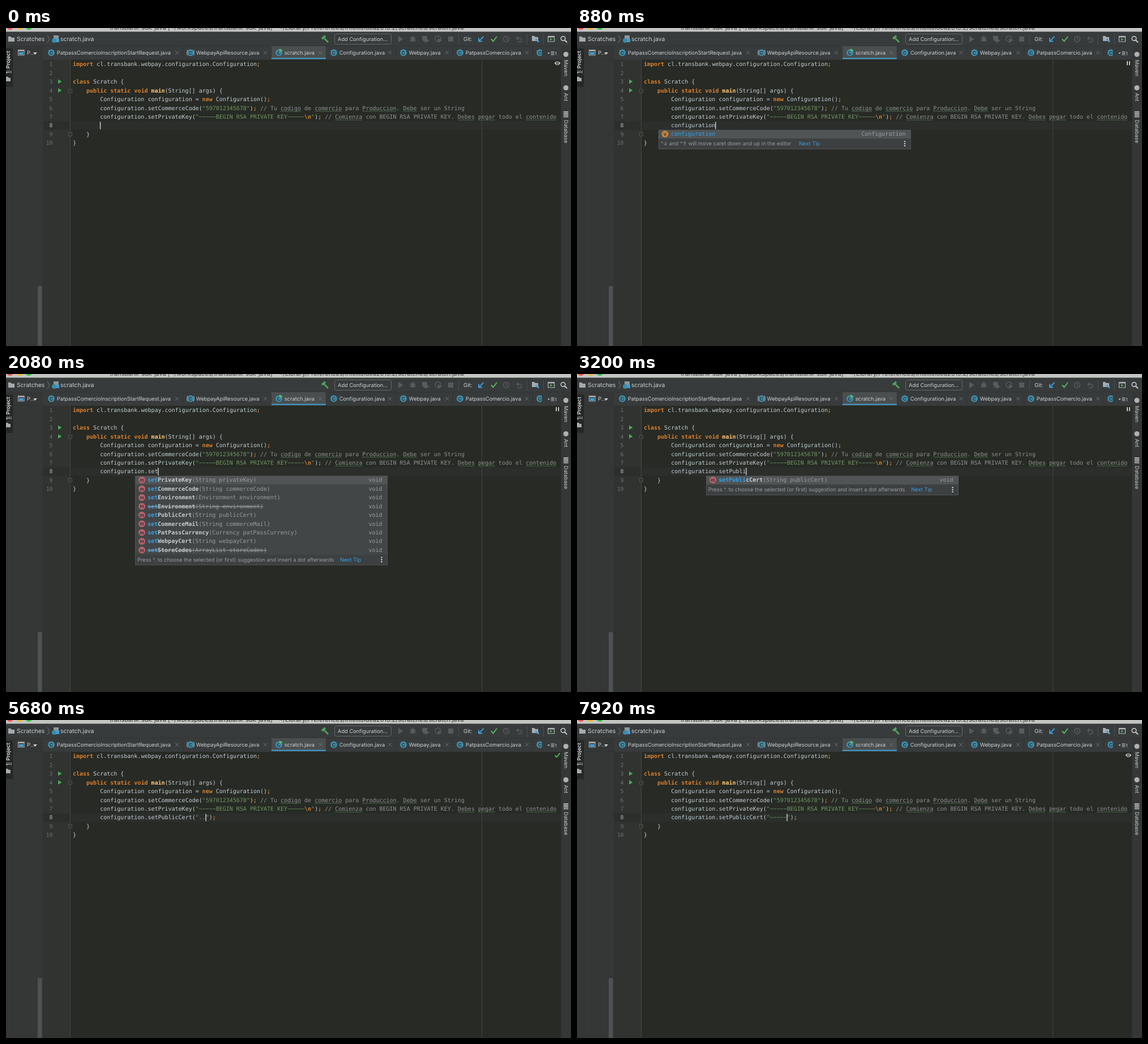
An HTML page with a canvas that plays this animation: 998 by 561 pixels, repeating every 8 s.

```html
<!DOCTYPE html>
<html lang="es">
<head>
<meta charset="utf-8">
<title>Editor</title>
<style>
html, body { margin: 0; width: 100%; height: 100%; overflow: hidden; background: #272a25; }
canvas { display: block; }
</style>
</head>
<body>
<canvas id="stage" width="998" height="561"></canvas>
<script>
const g = document.getElementById('stage').getContext('2d');
const MONO = '"DejaVu Sans Mono", monospace', SANS = 'Inter, sans-serif';
const COL = 6.016, ROW = 15.44, LEFT = 118;
const INK = { k: '#d9802f', t: '#c4ced4', s: '#6f9660', c: '#8d908e', u: '#8d908e', m: '#ffc66d' };
const PANEL = '#383b3b', SIDE = '#343736', EDGE = '#2f3231';
const GREY = '#a5abae', DIM = '#585b5c', LINK = '#35a0e8';
const GREEN = '#4fa35c', TEAL = '#3d8ba8', LABEL = '#cdd0d1';

function rect(x, y, w, h, color) {
  g.fillStyle = color;
  g.fillRect(x, y, w, h);
}
function text(str, x, y, size, color, align = 'left', font = SANS, weight = '') {
  g.font = `${weight} ${size}px ${font}`;
  g.fillStyle = color;
  g.textAlign = align;
  g.fillText(str, x, y);
}
function mono(str, x, y, color, weight) { text(str, x, y, 10, color, 'left', MONO, weight); }
function fill(d, color) {
  g.fillStyle = color;
  g.fill(new Path2D(d));
}
function line(d, color, width = 1.2) {
  g.strokeStyle = color;
  g.lineWidth = width;
  g.stroke(new Path2D(d));
}
function disc(x, y, r, color) {
  g.fillStyle = color;
  g.beginPath();
  g.arc(x, y, r, 0, 7);
  g.fill();
}
function ring(x, y, r, color, width) {
  g.strokeStyle = color;
  g.lineWidth = width;
  g.beginPath();
  g.arc(x, y, r, 0, 7);
  g.stroke();
}
function pill(x, y, w, h, r, color) {
  g.fillStyle = color;
  g.beginPath();
  g.roundRect(x, y, w, h, r);
  g.fill();
}
function badge(x, y, letter, color) {
  disc(x, y, 6, color);
  text(letter, x, y + 3, 8.5, '#2a2c2d', 'center', SANS, 600);
}
function turned(str, x, y, angle, color, weight) {
  g.save();
  g.translate(x, y);
  g.rotate(angle);
  text(str, 0, 0, 9.2, color, 'left', SANS, weight);
  g.restore();
}
function folder(x, y, color) {
  fill(`M${x} ${y}h4l2 2h5v7h-11z`, color);
}
const base = n => 67.4 + ROW * (n - 1);

// "~x" switches the ink; "u" is a comment word marked as a typo
function code(str, n, col) {
  const y = base(n);
  const parts = str.split(/~(.)/);
  for (let i = 1; i < parts.length; i += 2) {
    const ink = parts[i], s = parts[i + 1];
    const x = LEFT + col * COL, end = x + s.length * COL;
    mono(s.replace(/-/g, '−'), x, y, INK[ink], 'km'.includes(ink) ? 'bold' : '');
    if (ink === 'u') {
      let d = `M${x} ${y + 3}`;
      for (let k = 1; x + 2 * k < end; k++) d += `L${x + 2 * k} ${y + 3 - k % 2 * 1.6}`;
      line(d, '#5b8560', 0.8);
    }
    col += s.length;
  }
}

const SOURCE = [
  [1, 0, '~kimport ~tcl.transbank.webpay.configuration.Configuration~k;'],
  [3, 0, '~kclass ~tScratch {'],
  [4, 4, '~kpublic static void ~mmain~t(String[] args) {'],
  [5, 8, '~tConfiguration configuration = ~knew ~tConfiguration()~k;'],
  [6, 8, '~tconfiguration.setCommerceCode(~s"597012345678"~t)~k; ~c// Tu ~ucodigo~c de ~ucomercio~c para ~uProduccion~c. ~uDebe~c ser un String'],
  [7, 8, '~tconfiguration.setPrivateKey(~s"-----BEGIN RSA PRIVATE KEY-----~k\\n~s"~t)~k; ~c// ~uComienza~c con BEGIN RSA PRIVATE KEY. ~uDebes~c ~upegar~c todo el ~ucontenido'],
  [9, 4, '~t}'],
  [10, 0, '~t}']
];

// A leading "-" marks a deprecated method
const SETTERS = [
  'setPrivateKey(String privateKey)', 'setCommerceCode(String commerceCode)',
  'setEnvironment(Environment environment)', '-setEnvironment(String environment)',
  'setPublicCert(String publicCert)', 'setCommerceMail(String commerceMail)',
  'setPatPassCurrency(Currency patPassCurrency)', 'setWebpayCert(String webpayCert)',
  '-setStoreCodes(ArrayList storeCodes)'
].map(s => [s, 'void']);
const GETTERS = [
  ['getCommerceCode()', 'String'], ['getCommerceMail()', 'String'], ['getEnvironment()', 'Environment'],
  ['getPatPassCurrency()', 'Currency'], ['getPrivateKey()', 'String'], ['getPublicCert()', 'String'],
  ['getWebpayCert()', 'String']
];

// time, text of line 8 with "|" as caret, inspection icon
const STEPS = [[0, '|', 'eye']];
[1, 2, 3, 4, 5, 6, 7, 8, 9, 11, 13].forEach((n, i) =>
  STEPS.push([80 + 80 * i, 'configuration'.slice(0, n) + '|', 'pause']));
[[1040, ''], [1680, 's'], [1840, 'se'], [2000, 'set'], [2320, 'setP'], [2560, 'setPu'],
 [2720, 'setPub'], [2880, 'setPubl'], [2960, 'setPubli']].forEach(([t, s]) =>
  STEPS.push([t, `configuration.${s}|`, 'pause']));
[[3440, '|)', 'pause'], [3520, '|)', 'eye'], [3760, '|);', 'pause'], [4160, '"|");', 'eye'],
 [4480, '"|");', 'check'], [5360, '".|");', 'eye'], [5600, '"..|");', 'eye'],
 [5680, '"..|");', 'check'], [6160, '"..|");', 'eye'], [6320, '".|");', 'pause'],
 [6480, '"|");', 'pause'], [6640, '"|");', 'eye'], [6720, '"|");', 'check'],
 [6960, '"-|");', 'eye'], [7200, '"--|");', 'eye'], [7360, '"---|");', 'eye'],
 [7600, '"----|");', 'eye'], [7840, '"-----|");', 'eye']].forEach(([t, s, icon]) =>
  STEPS.push([t, `configuration.setPublicCert(${s}`, icon]));

function topBar() {
  rect(0, 0, 998, 56, PANEL);
  rect(0, 0, 998, 6.5, '#c3c5c2');
  ['#f2564f', '#f4b82e', '#35c648'].forEach((c, i) => disc(7 + 16.7 * i, -2.5, 5.8, c));
  text('transbank-sdk-java [~/workspaces/transbank-sdk-java] - ~/Library/Preferences/IntelliJIdea2019.2/scratches/scratch.java',
    496, 2.6, 10.9, '#3c3e3d', 'center');
  folder(4, 15, GREY);
  text('Scratches', 19, 23.4, 10.4, LABEL);
  line('M73 13l4 6.5-4 6.5', '#74787a', 1);
  fill('M84 13h9v10h-9z', '#8b969d');
  disc(85, 22, 4, TEAL);
  fill('M88 19h6v6h-6z', '#3f9bd0');
  text('scratch.java', 96, 23.4, 10.4, LABEL);

  line('M561 17l8 8', GREEN, 2.6);
  line('M558 19l6-5', GREEN, 3.6);
  g.strokeStyle = '#65696b';
  g.lineWidth = 1;
  g.beginPath();
  g.roundRect(580.5, 10.5, 100, 18, 3);
  g.stroke();
  text('Add Configuration...', 586, 22.8, 9.3, LABEL);

  fill('M693 14l8.5 5.5-8.5 5.5z', DIM);
  disc(718.5, 20, 4, DIM);
  line('M713 17l11 6M713 23l11-6M716 14l2 2 3-2', DIM);
  fill('M735 14h9v6l-4 5q-5-3-5-7z', DIM);
  fill('M741 18l7 4-7 4z', DIM);
  ring(763, 19, 5, DIM, 1.4);
  fill('M763 18l7 4-7 4z', DIM);
  rect(781, 15, 9, 9, DIM);
  rect(799, 11, 1, 18, '#4b4e50');
  text('Git:', 808, 22.8, 9.6, LABEL);
  line('M843.5 15l-8 8M835 17.5v6h6', '#3c9fdc', 1.8);
  line('M857 19.5l3.5 4 6.5-8.5', '#57b560', 2);
  ring(883.5, 19.5, 5, DIM, 1.4);
  line('M883.5 16v4l3 1.5', DIM);
  line('M905 15l-3 3 3 3M902 18h6q3 1 3 3.5t-3 3h-4', DIM, 1.5);
  rect(920, 11, 1, 18, '#4b4e50');
  folder(929, 14, GREY);
  rect(935, 19, 3, 3, '#3c9fdc');
  rect(938.5, 22, 3, 3, '#3c9fdc');
  rect(949, 11, 1, 18, '#4b4e50');
  line('M957.5 15h11v9h-11z', '#b0b5b7', 1.2);
  rect(957, 14, 12, 2.5, '#b0b5b7');
  fill('M961 17.5l4.5 2.5-4.5 2.5z', GREEN);
  ring(984, 18.5, 3.8, LABEL, 1.5);
  line('M987 21.5l4 4', LABEL, 1.8);
}

function tabs() {
  rect(0, 31.5, 998, 0.8, EDGE);
  rect(468, 32, 97, 23, '#4a4e4f');
  rect(468, 52.5, 97, 2.5, '#4390b6');
  [[80, 'PatpassComercioInscriptionStartRequest', 302], [326, 'WebpayApiResource', 458],
   [482, 'scratch', 555], [579, 'Configuration', 678], [702, 'Webpay', 779],
   [802, 'PatpassComercio', 920]].forEach(([x, name, close]) => {
    badge(x, 43.5, 'C', TEAL);
    text(name + '.java', x + 9.7, 46.8, 9.33, LABEL);
    line(`M${close - 3} 40.5l6 6m0-6l-6 6`, '#74787a', 0.9);
    rect(close + 10, 33, 0.8, 22, EDGE);
  });
  line('M320.5 38.5q-2 5 0 10M331.5 38.5q2 5 0 10', GREY, 1);
  fill('M483 36l6 3.5-6 3.5z', '#59b869');
  g.save();
  g.beginPath();
  g.rect(931, 33, 15.5, 22);
  g.clip();
  badge(943, 43.5, 'C', TEAL);
  g.restore();
  fill('M956.5 43.5h4l-2 2.5z', LABEL);
  line('M962.5 42h6m-6 2.5h6m-6 2.5h6', LABEL, 1);
  text('1', 969.5, 47.5, 8, LABEL);
}

function sides() {
  rect(0, 32, 66, 529, SIDE);
  rect(0, 36, 12, 68, '#252827');
  rect(12, 32, 1, 529, EDGE);
  turned('1: Project', 7.2, 80.5, -Math.PI / 2, '#eceeee', 500);
  rect(8.5, 75, 0.8, 5, '#eceeee');
  fill('M0 86h3l2 2h3v6h-8z', GREY);
  rect(13, 55, 53, 1, EDGE);
  line('M21.5 39h10.5v9h-10.5z', GREY, 1.2);
  rect(21, 38.5, 11.5, 2.5, GREY);
  rect(23, 42.5, 7.5, 4.5, '#3c9fdc');
  text('P...', 37, 47, 9.5, LABEL);
  fill('M48 43h7l-3.5 4z', LABEL);
  pill(56, 455, 7.5, 112, 3, '#4f5252');
  rect(65, 56, 1, 505, EDGE);

  rect(981, 32, 17, 529, SIDE);
  rect(980, 56, 1, 505, EDGE);
  disc(989, 46.5, 4.5, '#afb1b3');
  turned('Maven', 985.8, 56, Math.PI / 2, LABEL);
  disc(989, 105.5, 4.5, '#afb1b3');
  turned('Ant', 985.8, 114.5, Math.PI / 2, LABEL);
  for (let i = 0; i < 4; i++) pill(984.5, 147 + 2.8 * i, 9, 2, 1, '#afb1b3');
  turned('Database', 985.8, 162, Math.PI / 2, LABEL);
}

function editor() {
  rect(66, 56, 915, 505, '#272a25');
  rect(66, 56, 47, 505, '#303330');
  rect(66, 164.5, 914, ROW, '#2b2e2b');
  rect(113, 56, 0.9, 505, '#474a47');
  rect(840, 56, 1, 505, '#41443f');
  for (let n = 1; n <= 10; n++)
    text(n, 82.5, base(n), 9.8, n === 8 ? '#b4b7b7' : '#6b6f6f', 'right', MONO);
  [94.5, 110].forEach(y => fill(`M92 ${y - 4}l6.5 4-6.5 4z`, '#4aa856'));
  [111, 187.5].forEach(y => {
    rect(110, y - 3.5, 7, 7, '#272a25');
    line(`M110.5 ${y - 3}h6v6h-6zM112 ${y}h3`, '#5e625e', 0.8);
  });
  SOURCE.forEach(([n, col, s]) => code(s, n, col));
}

function inspection(icon) {
  if (icon === 'pause') {
    rect(971, 58.5, 2, 7, '#c0c3c4');
    rect(975, 58.5, 2, 7, '#c0c3c4');
  } else if (icon === 'check') {
    line('M969.5 62.5l3 3 6-7', '#4aa856', 2.2);
  } else {
    fill('M968.5 62q5.5-7 11 0q-5.5 7-11 0z', '#c0c3c4');
    disc(974, 62, 2.4, '#33363a');
    disc(974, 62, 1.1, '#c0c3c4');
  }
}

// Draws the box and returns a function that adds the hint row on top
function popup(x, right, listHeight, hint, linkX) {
  const y = 180, bottom = y + listHeight + 18;
  rect(x, y, right - x, bottom - y, '#434647');
  rect(x, y, right - x, 14.7, '#505455');
  return () => {
    rect(x, y + listHeight, right - x, 18, '#3d4041');
    text(hint, x + 4, bottom - 6.2, 9.36, '#969b9e');
    text('Next Tip', linkX, bottom - 6.2, 9.36, LINK);
    for (let i = -1; i < 2; i++) disc(right - 10.5, bottom - 9.5 + i * 3.8, 1.2, '#d0d2d3');
    g.strokeStyle = '#55585a';
    g.lineWidth = 0.8;
    g.strokeRect(x + 0.4, y, right - x - 0.8, bottom - y);
  };
}

function variablePopup(prefix) {
  const finish = popup(144, 589.5, 15.4, '^↓ and ^↑ will move caret down and up in the editor', 392);
  badge(155.5, 187, 'v', '#c4823a');
  mono(prefix, 166, 190.4, LINK);
  mono('configuration'.slice(prefix.length), 166 + prefix.length * COL, 190.4, '#c8cccf');
  text('Configuration', 580.5, 190.4, 10, '#999da0', 'right', MONO);
  finish();
}

function methodPopup(prefix) {
  const all = !prefix;
  const rows = all ? SETTERS.slice(0, 5).concat(GETTERS)
    : SETTERS.filter(([s]) => s.replace('-', '').startsWith(prefix));
  const height = all ? 177.5 : rows.length * ROW;
  const finish = popup(228, 674, height,
    'Press ^. to choose the selected (or first) suggestion and insert a dot afterwards', 590);
  g.save();
  g.beginPath();
  g.rect(228, 180, 446, height);
  g.clip();
  rows.forEach(([sign, type], i) => {
    const y = 190.4 + ROW * i, s = sign.replace('-', '');
    const typed = prefix.length, cut = s.indexOf('(');
    badge(240, y - 3.3, 'm', '#b8626a');
    mono(prefix, 250, y, LINK, 'bold');
    mono(s.slice(typed, cut), 250 + typed * COL, y, '#c8cccf', 'bold');
    mono(s.slice(cut), 250 + cut * COL, y, '#999da0');
    if (sign[0] === '-') rect(250, y - 3.3, s.length * COL, 1, '#a5a9ab');
    text(type, all ? 652.5 : 664.5, y, 10, '#999da0', 'right', MONO);
  });
  if (all) pill(664.5, 182.5, 7, 36.5, 2.5, '#66696b');
  g.restore();
  finish();
}

function draw(now) {
  const t = now % 8000;
  const [, typed, icon] = STEPS.filter(s => s[0] <= t).pop();
  g.textRendering = 'geometricPrecision';
  editor();
  topBar();
  tabs();
  sides();
  inspection(icon);
  const plain = typed.replace('|', '');
  code('~t' + plain.replace(/"[^"]*"/, '~s$&~t').replace(';', '~k;'), 8, 8);
  rect(LEFT + (8 + typed.indexOf('|')) * COL - 0.3, 165.5, 1.4, 13, '#d0d3d4');
  const method = typed.match(/^configuration\.(\w*)\|$/);
  if (method) methodPopup(method[1]);
  else if (/^co\w*\|$/.test(typed)) variablePopup(plain);
}

const start = performance.now();
function tick() {
  draw(performance.now() - start);
  requestAnimationFrame(tick);
}
tick();
</script>
</body>
</html>
```
